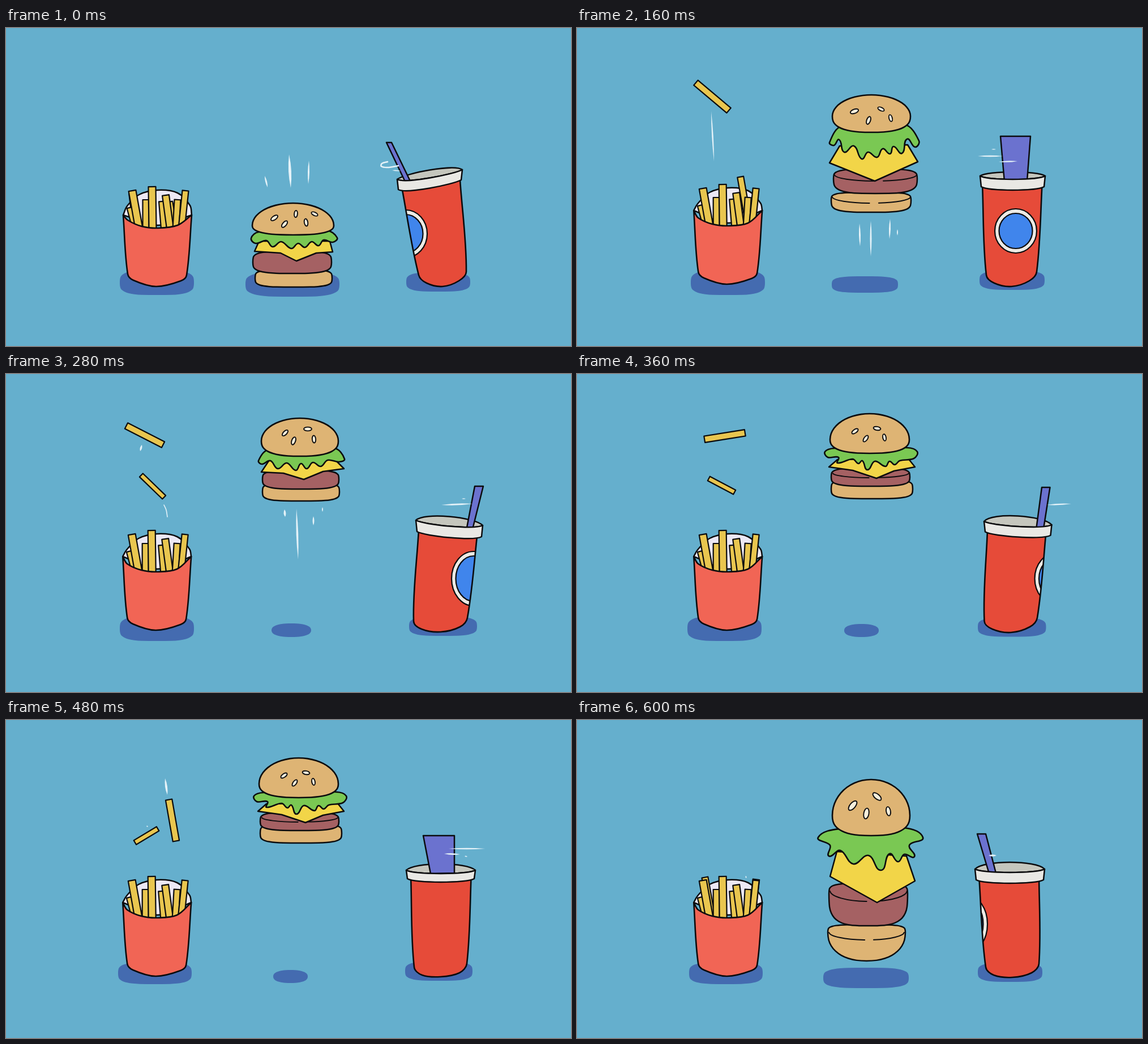
An HTML page with a canvas that plays this animation: 998 by 561 pixels, repeating every 640 ms.

```html
<!DOCTYPE html>
<html lang="en">
<head>
<meta charset="utf-8">
<title>Fast food</title>
<style>
html, body { margin: 0; width: 100%; height: 100%; overflow: hidden; background: #65afcd; }
canvas { display: block; width: 100vw; height: 100vh; }
</style>
</head>
<body>
<canvas id="stage" width="998" height="561"></canvas>
<script>
const ctx = document.getElementById('stage').getContext('2d');
const STEP = 80, STEPS = 8;
const C = {
  bg: '#65afcd', shade: '#446bb0', ink: '#0b0b0d', box: '#f16555', inner: '#ece8f4',
  fry: '#e9c64f', bun: '#deb474', seed: '#f6efdc', leaf: '#7ac853', cheese: '#f2d548',
  patty: '#a56163', cup: '#e64b39', lid: '#e9e8e4', hole: '#c5c6bd', straw: '#6b72cf',
  ring: '#edebe5', blue: '#4085ec', air: '#e4f2f8'
};

// ---- helpers ----
const mix = (a, b) => a.map((v, i) => (v + b[i]) / 2);
// seven drawn poses; step 4 lies halfway between its neighbours
const at = (keys, i) => i < 4 ? keys[i] : i > 4 ? keys[i - 1] : mix(keys[3], keys[4]);

function paint(path, fill, lw = 2.5) {
  if (fill) { ctx.fillStyle = fill; ctx.fill(path); }
  if (lw) { ctx.strokeStyle = C.ink; ctx.lineWidth = lw; ctx.stroke(path); }
}

// smooth curve through x,y pairs; a doubled point makes a corner
function curve(p, closed = true) {
  const n = p.length / 2, path = new Path2D();
  const pt = i => {
    const k = closed ? (i + n) % n : Math.max(0, Math.min(n - 1, i));
    return [p[2 * k], p[2 * k + 1]];
  };
  const unit = (a, b) => {
    const dx = b[0] - a[0], dy = b[1] - a[1], d = Math.hypot(dx, dy) || 1;
    return [dx / d, dy / d];
  };
  path.moveTo(p[0], p[1]);
  for (let i = 0; i < (closed ? n : n - 1); i++) {
    const a = pt(i), b = pt(i + 1);
    const r = Math.hypot(b[0] - a[0], b[1] - a[1]) / 3;
    if (!r) continue;
    const u = unit(pt(i - 1), b), v = unit(a, pt(i + 2));
    path.bezierCurveTo(a[0] + u[0] * r, a[1] + u[1] * r, b[0] - v[0] * r, b[1] - v[1] * r, b[0], b[1]);
  }
  if (closed) path.closePath();
  return path;
}

function poly(p) {
  const path = new Path2D();
  for (let i = 0; i < p.length; i += 2) path.lineTo(p[i], p[i + 1]);
  path.closePath();
  return path;
}

function oval(x, y, rx, ry, deg = 0) {
  const path = new Path2D();
  path.ellipse(x, y, rx, ry, deg * Math.PI / 180, 0, Math.PI * 2);
  return path;
}

// soft box, widest at the share "mid" of its height; 1 is an ellipse, less is squarer
function blob([x0, y0, x1, y1, mid = 0.5], up = 0.6, low = up) {
  const pts = [], h = y1 - y0, soft = (v, e) => Math.sign(v) * Math.abs(v) ** e;
  for (let k = 0; k < 28; k++) {
    const a = k * Math.PI / 14, s = Math.sin(a), e = s < 0 ? up : low;
    pts.push((x0 + x1 + (x1 - x0) * soft(Math.cos(a), e)) / 2,
      y0 + h * mid + soft(s, e) * h * (s < 0 ? mid : 1 - mid));
  }
  return curve(pts);
}

const shadow = (box, round) => paint(blob(box, round), C.shade, 0);

// thin stroke tapering at both ends
function dash(x0, y0, x1, y1, w = 2.6) {
  const d = Math.hypot(x1 - x0, y1 - y0), nx = (y0 - y1) / d * w, ny = (x1 - x0) / d * w;
  const mx = (x0 + x1) / 2, my = (y0 + y1) / 2;
  const path = new Path2D();
  path.moveTo(x0, y0);
  path.quadraticCurveTo(mx + nx, my + ny, x1, y1);
  path.quadraticCurveTo(mx - nx, my - ny, x0, y0);
  paint(path, C.air, 0);
}

function curl(p, w) {
  ctx.strokeStyle = C.air;
  ctx.lineWidth = w;
  ctx.stroke(curve(p, false));
}

// ---- fries ----
// top x, y, foot x, width
const FRIES = [
  [218, 317, 228, 9], [247, 303, 247, 11], [223, 287, 235, 13], [258, 280, 259, 13],
  [275, 306, 279, 10], [282, 295, 290, 12], [303, 303, 300, 11], [317, 287, 310, 11]
];
// centre x, y, length, angle
const FLY_A = [
  [229, 341, 99, 83], [228, 298, 99, 83], [239, 121, 76, 40], [245, 108, 73, 27],
  [277, 111, 72, -45], [294, 177, 74, -100], [312, 318, 74, -83]
];
const FLY_B = [
  [296, 348, 84, 80], [296, 348, 84, 80], [296, 304, 84, 80], [259, 198, 56, 44],
  [252, 195, 47, 12], [248, 204, 47, -31], [232, 312, 70, -100]
];

function stick(x, y, len, deg, w) {
  ctx.save();
  ctx.translate(x, y);
  ctx.rotate(deg * Math.PI / 180);
  const path = new Path2D();
  path.rect(-len / 2, -w / 2, len, w);
  paint(path, C.fry, 2.2);
  ctx.restore();
}

function fry([x, y, foot, w]) {
  const dx = foot - x, dy = 354 - y;
  stick((x + foot) / 2, y + dy / 2, Math.hypot(dx, dy), Math.atan2(dy, dx) * 180 / Math.PI, w);
}

function drawFries(i) {
  const left = i < 4 ? 201 : i < 6 ? 195 : 198;
  shadow([left, 427, left + (i < 6 ? 131 : 130), i < 6 ? 471 : 466]);
  const up = i > 1 ? -4 : 0, dx = up / 5, rim = i > 1 ? 326 : 330;
  const l = [207, rim, 207, rim], r = [328, rim, 328, rim];
  const boxed = draw => {
    ctx.save();
    ctx.translate(dx, up);
    draw();
    ctx.restore();
  };
  boxed(() => paint(curve([...l, 214, 314, 235, 294, 268, 286, 303, 291, 325, 313, ...r, 268, 348]), C.inner));
  stick(...at(FLY_B, i), i > 2 && i < 7 ? 8.5 : 11);
  stick(...at(FLY_A, i), 11.5);
  boxed(() => {
    FRIES.forEach(fry);
    paint(curve([...l, 215, 339, 240, 350, 268, 353, 303, 348, ...r, 319, 436, 309, 446,
      265, 456, 225, 445, 215, 434]), C.box, 2.6);
  });
}

// ---- burger ----
// slabs: x0, y0, x1, y1, widest height; seeds: x, y, radius, angle; rims: x0, x1, y, sag
const REST = {
  shade: [423, 430, 589, 474], base: [440, 426, 576, 457], patty: [436, 394, 575, 433],
  cheese: [447, 376, 572, 376, 577, 395, 548, 397, 513, 411, 485, 397, 439, 394],
  leaf: [446, 360, 433, 371, 441, 380, 460, 375, 471, 386, 486, 377, 504, 389, 516, 380, 528, 387,
    540, 377, 552, 384, 561, 374, 577, 378, 585, 370, 566, 357],
  bun: [435, 309, 579, 365, 0.7],
  seeds: [[474, 335, 7, -35], [512, 328, 6, 95], [545, 328, 6, 25], [492, 346, 7, -50], [530, 343, 6.5, 80]],
  rims: []
};

const RISE = {
  shade: [450, 438, 567, 467], base: [449, 290, 590, 325, 0.4], patty: [453, 249, 601, 292, 0.4],
  cheese: [446, 238, 464, 208, 584, 206, 602, 236, 526, 270],
  leaf: [468, 173, 446, 202, 454, 207, 463, 197, 472, 219, 489, 208, 503, 231, 514, 219, 530, 228,
    540, 213, 553, 222, 559, 209, 574, 221, 583, 196, 597, 210, 604, 199, 578, 170],
  bun: [451, 118, 589, 184, 0.57],
  seeds: [[490, 147, 7.5, -20], [537, 143, 6, 25], [515, 163, 7, -70], [554, 159, 6, 75]],
  rims: [[455, 600, 259, 11], [451, 589, 298, 11]]
};

const HIGH = {
  shade: [469, 440, 539, 464], base: [453, 192, 589, 224], patty: [453, 170, 588, 203],
  cheese: [451, 173, 465, 152, 580, 150, 597, 167, 560, 172, 526, 186, 490, 175],
  leaf: [463, 134, 446, 153, 452, 159, 467, 153, 480, 167, 496, 157, 512, 170, 521, 158, 531, 167,
    542, 156, 556, 163, 568, 152, 588, 155, 598, 150, 580, 131],
  bun: [451, 78, 587, 145, 0.6],
  seeds: [[493, 104, 6.5, -45], [533, 97, 7, 0], [508, 118, 7, -70], [544, 115, 6.5, 85]],
  rims: []
};

const TOP = {
  shade: [472, 441, 533, 464], base: [449, 183, 593, 217], patty: [449, 163, 588, 195],
  cheese: [445, 161, 460, 148, 585, 146, 597, 161, 560, 168, 529, 181, 487, 167],
  leaf: [455, 128, 438, 134, 443, 144, 462, 144, 460, 154, 487, 147, 497, 155, 504, 150, 513, 166,
    526, 151, 545, 160, 552, 151, 561, 157, 570, 150, 595, 146, 601, 134, 583, 127],
  bun: [447, 67, 587, 137, 0.65],
  seeds: [[491, 98, 6.5, -35], [530, 93, 6.5, 10], [510, 111, 6.5, -55], [543, 109, 6, 80]],
  rims: [[452, 586, 172, 8]]
};

const FALL = {
  shade: [435, 437, 586, 473], base: [443, 361, 580, 425, 0.22], patty: [445, 288, 584, 363, 0.25],
  cheese: [447, 276, 459, 232, 582, 240, 597, 284, 530, 322],
  leaf: [465, 192, 426, 207, 447, 221, 445, 240, 465, 230, 488, 254, 515, 239, 537, 265, 552, 236,
    567, 250, 578, 237, 596, 241, 587, 221, 611, 207, 576, 190],
  bun: [451, 105, 588, 204, 0.64],
  seeds: [[487, 151, 10, -50], [530, 135, 9, 40], [511, 165, 9.5, -80], [550, 161, 8, 80]],
  rims: [[447, 583, 301, 19], [445, 578, 374, 14]]
};
const BURGER = [REST, REST, RISE, HIGH, TOP, TOP, TOP, FALL];

// front edge of a cut face, broken near the middle
function rim([x0, x1, y, sag]) {
  const path = new Path2D(), rx = (x1 - x0) / 2;
  path.ellipse(x0 + rx, y, rx, sag, 0, 0.05, Math.PI * 0.44);
  path.moveTo(x0 + rx * 0.95, y + sag);
  path.ellipse(x0 + rx, y, rx, sag, 0, Math.PI * 0.52, Math.PI - 0.05);
  paint(path, null, 2);
}

function drawBurger(i) {
  const b = BURGER[i];
  shadow(b.shade, b === HIGH || b === TOP ? 0.85 : 0.6);
  ctx.save();
  ctx.translate(0, i === 4 ? 3 : 0);
  paint(blob(b.base, 0.5, b === FALL ? 0.9 : 0.55), C.bun);
  paint(blob(b.patty, 0.5, 0.6), C.patty);
  b.rims.forEach(rim);
  paint(poly(b.cheese), C.cheese);
  paint(curve(b.leaf), C.leaf, 2.6);
  paint(blob(b.bun, 1, 0.78), C.bun, 2.6);
  b.seeds.forEach(([x, y, r, deg]) => paint(oval(x, y, r, r * 0.48, deg), C.seed, 1.9));
  ctx.restore();
}

// ---- cup ----
// shadow: left, right, bottom
const CUP_SHADE = [
  [707, 820, 465], [706, 820, 464], [711, 826, 462], [712, 832, 462],
  [704, 825, 465], [705, 824, 460], [708, 822, 462]
];
// top left, foot left, foot right, top right, bottom
const BODY = [
  [698, 729, 813, 802, 456], [707, 722, 813, 817, 455], [716, 723, 812, 822, 456], [729, 720, 815, 834, 455],
  [721, 719, 811, 825, 457], [715, 721, 814, 822, 453], [710, 722, 816, 816, 454]
];
// left x, y, right x, y, back rise, band height
const LID = [
  [691, 267, 806, 250, 8, 18], [701, 264, 824, 252, 5, 19], [712, 261, 827, 261, 7, 19], [724, 258, 842, 267, 11, 20],
  [714, 262, 835, 265, 14, 17], [707, 265, 829, 265, 11, 15], [703, 263, 826, 263, 12, 19]
];
// top left, top right, top y, foot left, foot right
const STRAW = [
  [672, 681, 202, 705, 714], [707, 721, 193, 730, 740], [748, 801, 191, 755, 795], [828, 843, 198, 814, 825],
  [814, 828, 202, 809, 824], [737, 792, 204, 750, 792], [707, 722, 201, 728, 740]
];
// centre x, y, radii
const RING = [
  [706, 363, 38, 42], [750, 361, 33, 48], [775, 358, 37, 39], [826, 361, 39, 48],
  [869, 361, 39, 44], [869, 361, 39, 44], [690, 360, 35, 50]
];

function arc(path, x0, y0, x1, y1, bulge) {
  const inset = (x1 - x0) * 0.12, c = bulge * 4 / 3;
  path.bezierCurveTo(x0 + inset, y0 + c, x1 - inset, y1 + c, x1, y1);
}

function drawCup(i) {
  const [sl, sr, sb] = at(CUP_SHADE, i);
  shadow([sl, sb - 34, sr, sb]);

  const [tl, bl, br, tr, foot] = at(BODY, i);
  const body = curve([tl, 275, tl, 275, bl, 436, bl + 14, 450, (bl + br) / 2, foot,
    br - 13, 446, br, 430, tr, 268, tr, 268]);
  paint(body, C.cup, 0);
  ctx.save();
  ctx.clip(body);
  const [cx, cy, w, h] = at(RING, i);
  paint(oval(cx, cy, w, h), C.ring, 2.2);
  paint(oval(cx, cy, w - 7.5, h - 8), C.blue, 2.2);
  ctx.restore();
  paint(body, null, 2.6);

  const [lx, ly, rx, ry, back, tall] = at(LID, i);
  const hole = new Path2D(), band = new Path2D(), sag = 6;
  hole.moveTo(lx, ly);
  arc(hole, lx, ly, rx, ry, -back);
  arc(hole, rx, ry, lx, ly, sag);
  paint(hole, C.hole);
  const [ta, tb, ty, fa, fb] = at(STRAW, i);
  paint(poly([ta, ty, tb, ty, fb, 270, fa, 271]), C.straw);
  band.moveTo(lx, ly);
  arc(band, lx, ly, rx, ry, sag);
  band.lineTo(rx - 2, ry + tall);
  arc(band, rx - 2, ry + tall, lx + 2, ly + tall, sag);
  band.closePath();
  paint(band, C.lid);
}

// ---- air lines ----
const AIR = [
  () => {
    dash(457, 261, 462, 281, 3);
    dash(500, 223, 503, 282, 5);
    dash(535, 234, 534, 275, 3);
    dash(682, 251, 697, 252, 2);
    curl([674, 236, 664, 239, 663, 244, 674, 246, 693, 243], 2.6);
  },
  () => {
    dash(692, 243, 710, 240, 3);
    dash(705, 247, 720, 244, 2);
  },
  () => {
    dash(237, 147, 242, 235);
    dash(499, 345, 500, 385, 3);
    dash(519, 340, 519, 403, 3);
    dash(553, 337, 552, 372, 3);
    dash(566, 355, 566, 366, 2);
    dash(708, 226, 752, 226);
    dash(745, 236, 778, 235);
    dash(732, 214, 740, 214, 1.5);
  },
  () => {
    dash(240, 125, 237, 136, 3.5);
    dash(492, 239, 493, 252, 4);
    dash(513, 238, 516, 327, 3.6);
    dash(543, 251, 543, 267, 3);
    dash(559, 235, 559, 243, 2);
    dash(769, 231, 824, 229, 3);
    dash(805, 220, 812, 220, 1.5);
    curl([279, 231, 283, 240, 285, 252], 1.6);
  },
  () => dash(830, 231, 873, 229),
  () => {
    dash(826, 243, 839, 244);
    curl([259, 97, 264, 93, 270, 97], 1.6);
    curl([814, 235, 836, 235, 847, 232, 847, 228, 838, 225], 2.6);
  },
  () => {
    dash(281, 103, 285, 132, 4);
    dash(248, 187, 251, 188, 2);
    dash(782, 227, 846, 227);
    dash(774, 236, 802, 237, 3);
    dash(810, 240, 815, 241, 2);
  },
  () => {
    dash(727, 239, 741, 239, 3.5);
    dash(298, 275, 299, 279, 2);
  }
];

function frame(now) {
  const i = Math.floor(now / STEP) % STEPS;
  ctx.lineJoin = ctx.lineCap = 'round';
  ctx.fillStyle = C.bg;
  ctx.fillRect(0, 0, 998, 561);
  drawFries(i);
  drawBurger(i);
  drawCup(i);
  AIR[i]();
}

const start = performance.now();
function tick() {
  frame(performance.now() - start);
  requestAnimationFrame(tick);
}
tick();
</script>
</body>
</html>
```
